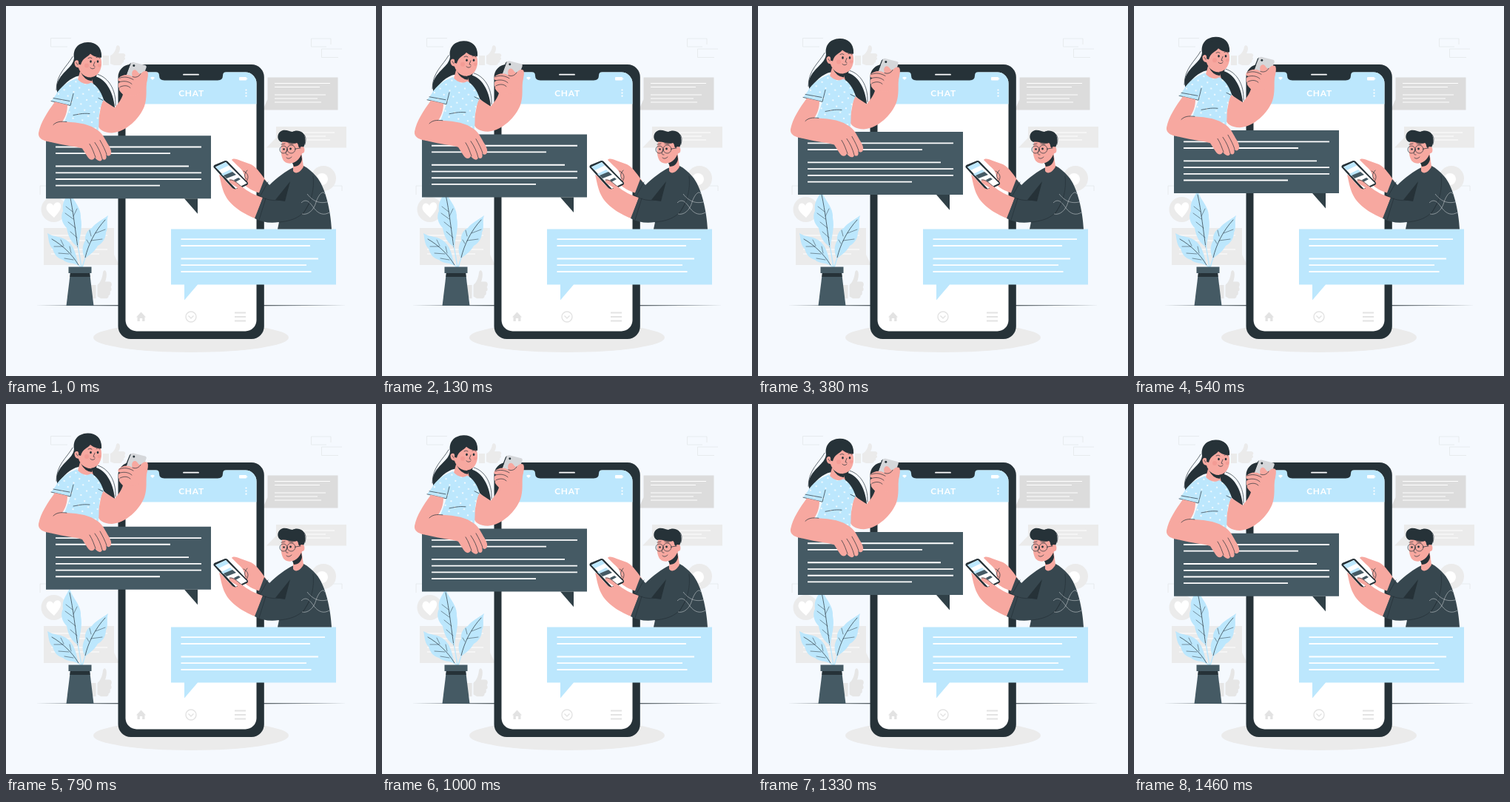
Recreate the animation shown at these times as an HTML page. Size 500x500 px, loop 1.5 s.

```html
<!DOCTYPE html>
<html lang="en">
<head>
<meta charset="utf-8">
<title>Chat</title>
<style>
  html, body { margin: 0; width: 100%; height: 100%; overflow: hidden; background: #f5f9fe; }
  svg { display: block; width: 100%; height: 100%; }
  text { font: 700 11.9px Lato, sans-serif; letter-spacing: .8px; }
  .ink { fill: #263238; }
  .slate { fill: #455a64; }
  .sky { fill: #bce7fd; }
  .skin { fill: #f7a8a0; }
  .wool { fill: #37474f; }
  .mist { fill: #ebebeb; }
  .white { fill: #fff; }
  .line { fill: none; stroke: #263238; stroke-width: .7; stroke-linecap: round; stroke-linejoin: round; }
  .vein { stroke-width: .5; }
  .rows { fill: none; stroke: #fff; stroke-width: 1.8; }
  .fine { stroke-width: 1.2; }
  .thin { fill: none; stroke: #e4e7ea; stroke-width: .8; }
  .icon { fill: none; stroke: #e3e3e3; stroke-width: 1.4; }
</style>
</head>
<body>
<svg viewBox="0 0 500 500">
  <defs>
    <pattern id="dots" width="13" height="14" patternUnits="userSpaceOnUse" patternTransform="rotate(12)">
      <rect width="13" height="14" class="sky"/>
      <circle cx="3" cy="3" r="1.1" class="white"/>
      <circle cx="9.5" cy="10" r="1.1" class="white"/>
    </pattern>
    <path id="thumb" d="M0 14H8V27H0ZM10 14C14 12 17 8 18 2C19-1 23 0 23 4C23 7 22 9 21 11H27C31 11 31 15 29 16C31 18 30 20 28 20C29 23 27 24 26 24C26 27 23 27 21 27H15L10 25Z"/>
  </defs>

  <g id="wall">
    <path class="thin" d="M88 43.500H60.500V55H83M439 44H412.500V55H433M439 44V52M454 58H426.500V69.500H449M46 255V243H54M440 243H454V250"/>
    <use href="#thumb" class="mist" x="131" y="53"/>
    <use href="#thumb" fill="#e6e6e6" transform="translate(114 357) scale(.95 1.42)"/>
    <path fill="#dcdcdc" d="M353.500 96.500H448.500V140.500H347L353.500 126Z"/>
    <path class="rows fine" d="M363 104.500H438M363 109.500H424M363 120H432M363 125H421M363 130H426"/>
    <path class="mist" d="M365 163H460V191.500H352L365 178Z"/>
    <path class="rows fine" d="M374 171H444M374 176H432M374 181H438"/>
    <circle class="mist" cx="429" cy="233" r="17"/>
    <circle class="white" cx="427" cy="234" r="8"/>
    <circle class="mist" cx="64.500" cy="275" r="17"/>
    <path class="white" d="M65 286C57 279 53 275 55 270C57 265 62 266 64 270C66 264 73 264 74 269C75 275 70 280 65 286Z"/>
    <path class="mist" d="M51 300H146V336L153 350H51Z"/>
    <path class="rows fine" d="M61 310H137M61 317H128M61 329H137M61 335H126"/>
  </g>

  <ellipse class="mist" cx="250" cy="448" rx="132" ry="20"/>
  <path class="ink" d="M40 404.700L150 404.200H350L460 404.700L350 405.200H150Z"/>

  <g id="plant">
    <path class="sky" d="M86 249C89 262 102 271 101 286C104 301 99 312 98 326C89 321 84 312 82 300C76 294 73 285 77 277C75 265 81 260 86 249Z"/>
    <path class="sky" d="M56 307C64 313 76 310 85 319C94 328 95 339 98 351C91 346 83 349 77 343C69 341 65 335 63 328C57 322 58 315 56 307Z"/>
    <path class="sky" d="M138 283C135 291 139 299 135 306C135 314 130 321 124 324C119 333 113 336 107 341C102 333 103 323 107 317C106 309 110 303 116 300C121 293 130 289 138 283Z"/>
    <path class="line" d="M86 255C91 277 94 307 97 326M62 315C76 323 89 335 98 350M134 289C120 304 111 323 107 340"/>
    <path class="line vein" d="M81 271L90 278M80 280L91 288M84 292L94 300M87 305L96 313M96 274L91 284M65 325L77 325M71 334L85 335M79 341L91 343M74 316L78 324M86 325L88 334M113 303L115 311M109 316L112 321M134 302L121 307M130 315L115 317"/>
    <path d="M97 323L102 353M98 350L101 353M107 340L103 353" fill="none" stroke="#bce7fd" stroke-width="1.500"/>
    <path class="slate" d="M87 360H113L118.500 405H81.500Z"/>
    <path class="ink" d="M87 360H113L113.700 366H86.300Z"/>
    <path class="slate" d="M84.500 352.500H115.500V361H84.500Z"/>
  </g>

  <g id="handset">
    <rect class="ink" x="151.500" y="79" width="197.300" height="371" rx="17"/>
    <rect class="white" x="161.500" y="89.500" width="177" height="350" rx="15"/>
    <path class="sky" d="M161.500 132.500V104.500A15 15 0 0 1 176.500 89.500H323.500A15 15 0 0 1 338.500 104.500V132.500Z"/>
    <path class="ink" d="M202 89H298Q293 89 293 94Q293 100.500 286 100.500H214Q207 100.500 207 94Q207 89 202 89Z"/>
    <path class="rows" d="M240 92.700H260" stroke-linecap="round"/>
    <text x="250.600" y="122" text-anchor="middle" class="white">CHAT</text>
    <g class="white">
      <circle cx="324.500" cy="113.500" r="1.100"/><circle cx="324.500" cy="117.600" r="1.100"/><circle cx="324.500" cy="121.700" r="1.100"/>
      <rect x="315" y="96" width="10" height="4.500" rx="1"/><rect x="325.300" y="97.300" width="1" height="2"/>
      <path d="M195 97Q198 94.500 201 97L198 100Z"/>
    </g>
    <path fill="#e3e3e3" d="M176 420.500L182.500 413.500L189 420.500H187.500V426H184.200V422H180.800V426H177.500V420.500Z"/>
    <circle class="icon fine" cx="250" cy="420" r="7"/>
    <path class="icon" d="M246.500 418.500L250 422L253.500 418.500"/>
    <path class="icon" d="M309 414.500H324M309 420H324M309 425.500H324" style="stroke-width:2"/>
  </g>

  <g id="reply">
    <path class="sky" d="M223 301.500H446V376.500H259L241 397.500V376.500H223Z"/>
    <path class="rows" d="M236.500 315.200H431M236.500 324H411M236.500 341.500H422M236.500 350.200H406M236.500 359H412.500"/>
  </g>

  <g id="man">
    <path class="skin" d="M305 208C307 205 312 207 317 209L331 214C340 219 346 229 352 237L343 253C334 250 326 246 321 240C325 231 321 222 313 216Z"/>
    <path class="ink" d="M280.500 218Q280 215.500 282.500 214.500L296 209Q298 208.500 299.500 210L326.500 238Q328 240.500 325.500 242L311 249Q309 250 307.500 248Z"/>
    <path class="white" d="M283 217.500L297 211L325.800 239.500L310.500 247Z"/>
    <path class="sky" d="M283 217.500L297 211L301 215.500L287.500 222ZM291 227L303 221L306 224L294 230Z"/>
    <path class="slate" d="M294 229L306 224L311 228L298 233ZM308 235L314 232L317 234L310 238Z"/>
    <path class="skin" d="M288 228C293 230 297 238 303 243C306 247 310 249 313 246C308 241 300 240 302 235C307 233 312 239 317 243C327 251 337 256 347 259L337 287C325 283 306 272 298 259C292 249 291 240 288 228Z"/>
    <path class="line" d="M321 223C327 226 329 231 325 237M326 222C321 228 322 231 325 234M302 235C307 234 312 239 317 243"/>
    <path class="wool" d="M389 218C379 222 365 233 356 242L349 234L341 255L347 259L336 287C345 292 357 294 369 292L367 301.500H440C439 279 432 244 419 230C414 224 408 219 402 216Z"/>
    <path class="ink" d="M384 237L364 262L377 264Z"/>
    <path class="line" d="M347 259C355 263 366 264 377 261M344 256L354 238M351 260L342 289M415 230C417 247 413 264 403 278C395 287 383 291 369 292M410 266L401 282"/>
    <path class="thin" opacity=".6" d="M399 266C406 259 411 266 416 273C423 282 430 283 437 279M400 281C408 283 416 276 419 265C423 253 429 249 431 254M407 254C417 267 428 267 437 264"/>
    <path class="skin" d="M388 206L399 196L402 217C398 225 391 228 388 223Z"/>
    <path class="ink" d="M387 212C393 210 397 206 399 200L400 207C399 213 395 217 389 217Z"/>
    <path class="skin" d="M374 181C371 190 371 201 374 207C377 214 388 215 395 207L401 198L401 180Z"/>
    <path class="ink" d="M372 184C365 181 366 170 374 168C380 167 383 170 387 170C394 166 404 170 404 178C405 183 404 187 402 191L397 192C394 190 396 187 393 185C386 188 379 182 372 184Z"/>
    <ellipse class="skin" cx="400" cy="194.500" rx="3.400" ry="4.500"/>
    <path class="line" d="M403 174C406 178 405 182 404 187M380 194C377 200 378 201 381 201M379 205Q382 208 386 204M372 187L377 186M382 186L388 187M391 193L398 192"/>
    <g class="line"><circle cx="375" cy="194" r="5"/><circle cx="385.500" cy="193.500" r="5.500"/></g>
    <circle class="ink" cx="375.500" cy="193.500" r="1.300"/><circle class="ink" cx="384.500" cy="193" r="1.400"/>
  </g>

  <g id="woman">
    <path class="ink" d="M92 70C90 58 97 49 110 48.500C121 48 129 55 129 66L122 95C133 98 145 113 147 137C136 133 126 121 118 107L98 94C88 96 76 106 70 118C65 105 73 95 81 87C87 81 91 77 92 70Z"/>
    <path class="line" d="M124 92C138 96 149 112 148 134M90 68C82 82 68 91 68 113"/>
    <path class="skin" d="M100 88L97 99C99 109 114 111 118 105L115 94Z"/>
    <path class="ink" d="M101 89Q107 97 117 96L116 101Q106 100 101 89Z"/>
    <path class="skin" d="M130 126L147 137C151 132 156 126 158 119L152 109C151 105 155 101 160 96L188 88C191 87 193 91 190 101C189 112 191 124 187 135C181 151 162 170 143 171C132 171 124 166 124 158Z"/>
    <path fill="#d5d7da" d="M168 78Q169 75 172 75.500L188 79.500Q190.500 80.500 189.500 83L184 98L162 95Z"/>
    <path class="ink" d="M169 76L162 94L160.500 94L167 78Z"/>
    <circle class="ink" cx="172.800" cy="80" r="1.500"/>
    <path class="skin" d="M152 97C157 92 165 91 171 95C169 90 171 85 175 86C178 87 179 92 182 91C185 88 188 86 191 88C193 91 191 100 189 109L176 120L158 119C154 115 151 112 154 109C151 107 151 103 155 102C151 101 151 99 152 97Z"/>
    <path class="line" d="M153 97C160 94 167 96 172 99M154 102C161 100 167 102 170 105M154 109C160 106 165 107 168 110M171 95C175 97 180 95 182 91"/>
    <path fill="url(#dots)" d="M96 97C86 101 73 108 67 120L61 128L87 134L78 159L90 172H124C128 153 122 146 132 126C128 114 122 106 115 103C110 107 100 104 96 97Z"/>
    <path class="line" d="M61 128L87 134L91 118M64 124L86 128M91 147C98 146 103 144 113 145M125 124L131 127"/>
    <path class="skin" d="M95 82C91 78 92 71 97 73C96 60 106 57 116 61C126 62 130 70 129 79C128 89 122 96 114 95.500C106 95 100 90 98 83Z"/>
    <path class="ink" d="M93 72C93 57 107 51 117 55C127 57 130 64 129 69C123 69 117 67 114 64C110 69 103 70 101 79L98 78C99 73 96 71 93 74Z"/>
    <path class="line" d="M111 70Q114 68 116 70M122 69Q125 67 127 70M120 75L118 80L120 81M114 83Q117 86 120 83M95 76L97 79"/>
    <ellipse class="ink" cx="114.500" cy="74.500" rx="1.300" ry="1.800"/><ellipse class="ink" cx="124" cy="74.500" rx="1.300" ry="1.800"/>
    <circle cx="109" cy="80" r="3" fill="#f08f89" opacity=".5"/><circle cx="126" cy="80" r="2.200" fill="#f08f89" opacity=".5"/>
    <path class="slate" d="M54 174.700H277V259.700H54Z"/>
    <path fill="#304047" d="M241 259.700H259V280.300Z"/>
    <path class="rows" d="M67 190H264M67 198.700H222M67 216H247M67 224.800H264M67 233.500H264M67 242.200H208"/>
    <path class="skin" d="M66 129L83 133C83 143 80 150 76 156C91 156 110 158 120 165C130 170 133 178 137 185C141 191 144 197 141 201C139 203 137 202 135 200C137 206 134 209 130 206C129 211 123 209 120 204C118 209 113 208 110 203L103 192C95 189 78 188 63 184C53 182 43 180 44 171C47 156 56 143 66 129Z"/>
    <path class="line" d="M113 186C117 192 119 199 121 204M120 184C125 191 128 198 130 206M127 181C131 188 134 194 136 200M64 160C68 156 73 155 82 156"/>
  </g>
</svg>
<script>
  const LOOP = 1500, LIFT = 10, REST = .5;
  const woman = document.getElementById('woman');

  function draw(now) {
    const phase = now % LOOP / LOOP;
    const y = REST - LIFT * (1 - Math.abs(2 * phase - 1));
    woman.setAttribute('transform', `translate(0 ${y})`);
    requestAnimationFrame(draw);
  }
  draw(0);
</script>
</body>
</html>
```
